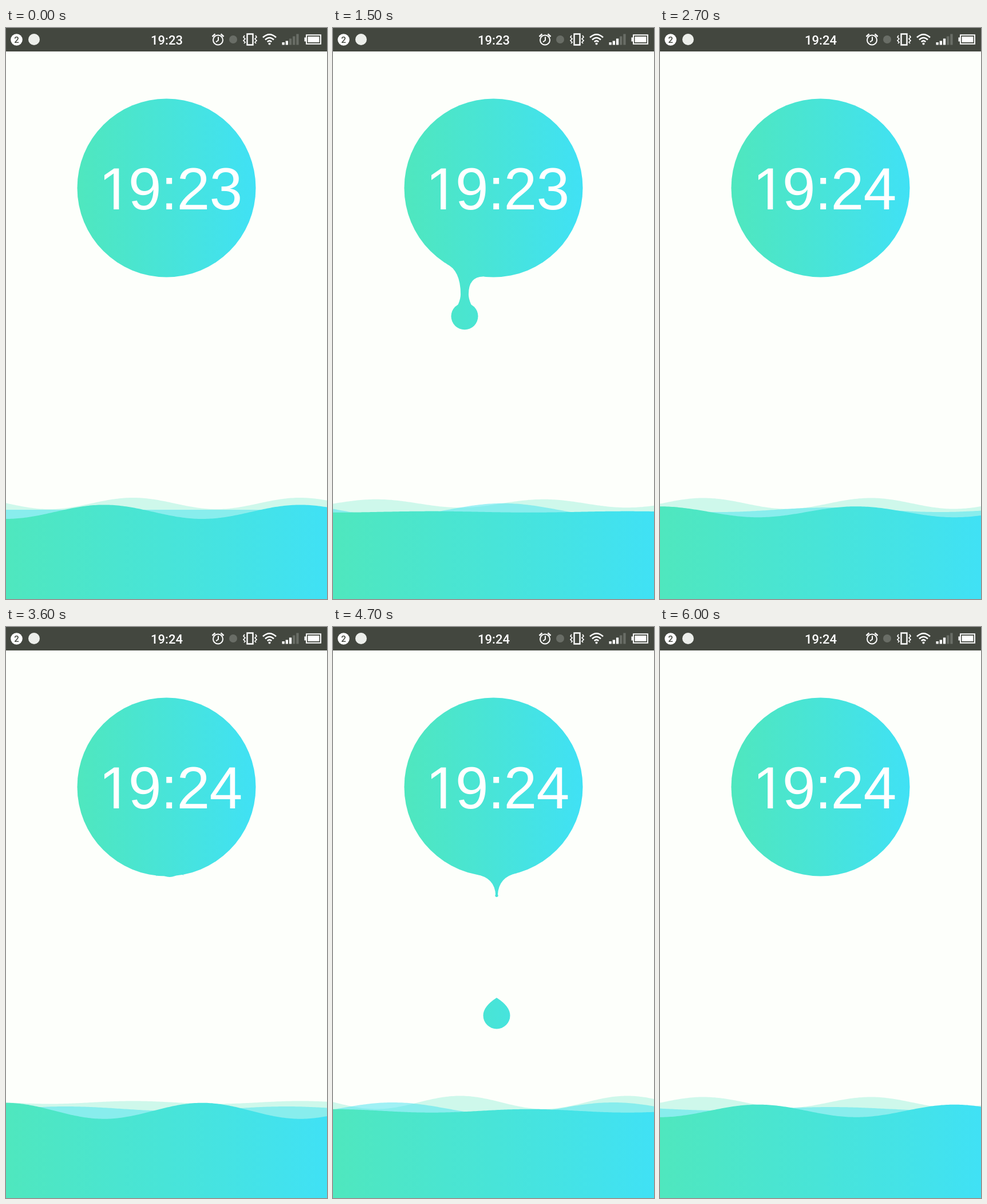
Animation, 561 px wide and 998 px high, one loop 6.1 s. Source, as an HTML page with a canvas:

```html
<!DOCTYPE html>
<html lang="en">
<head>
<meta charset="utf-8">
<title>Water clock</title>
<style>
  html, body { margin: 0; width: 100%; height: 100%; overflow: hidden; background: #fdfffb; }
  canvas { display: block; }
</style>
</head>
<body>
<canvas id="stage" width="561" height="998"></canvas>
<script>
const W = 561, H = 998, LOOP = 6100, STEP = 100;
const CX = 280.5, CY = 279.5, R = 156, BALL = 23.5;
const BAR = '#43473f', DIM = '#696d66';
const c = document.getElementById('stage').getContext('2d');

function gradient(x0, x1) {
  const g = c.createLinearGradient(x0, 0, x1, 0);
  g.addColorStop(0, '#4fe7be');
  g.addColorStop(0.5, '#48e4d8');
  g.addColorStop(1, '#40e1f5');
  return g;
}
const clockFill = gradient(CX - R, CX + R);

// Standing waves: [time, height] keys, joined by straight segments
const waves = [
  { level: 831, length: 292, crest: 222, fill: 'rgba(78,230,192,.27)',
    keys: [[0, 10], [900, 1.5], [2000, -14.5], [2100, -14.5], [2700, -9.5], [3600, 2.5], [4450, 13], [4700, 11.5], [6000, -9.5], [6100, -11]] },
  { level: 842, length: 385, crest: 297, fill: 'rgba(68,228,240,.5)',
    keys: [[0, 0], [900, 7.5], [1700, 12.5], [2100, 10], [2700, 4], [3600, -4], [4500, -12], [4700, -11], [6000, 3], [6100, 4]] },
  { level: 845.7, length: 343, crest: 171.5, fill: gradient(0, W),
    keys: [[0, 12.3], [900, 6.5], [2100, -4.3], [2700, -9.5], [3400, -14.5], [3600, -14], [4700, -3], [6000, 11], [6100, 12.3]] }
];

function valueAt(keys, t) {
  const i = keys.findIndex(k => k[0] > t);
  const [t0, v0] = keys[i - 1], [t1, v1] = keys[i];
  return v0 + (v1 - v0) * (t - t0) / (t1 - t0);
}

function drawWave({ level, length, crest, fill, keys }, t) {
  const height = valueAt(keys, t);
  c.beginPath();
  c.moveTo(0, H);
  for (let x = 0; x <= W; x += 3)
    c.lineTo(x, level - height * Math.cos(2 * Math.PI * (x - crest) / length));
  c.lineTo(W, H);
  c.fillStyle = fill;
  c.fill();
}

function disc(x, y, r, fill) {
  c.fillStyle = fill;
  c.beginPath();
  c.arc(x, y, r, 0, 2 * Math.PI);
  c.fill();
}

const rim = x => CY + Math.sqrt(R * R - (x - CX) ** 2);

// Height of the bend where the rim turns into the hanging water
const bend = (x, side) => (rim(x) + rim(side)) / 2 + 4;

function drawDrip(x, s) {
  if (s < -0.24 || s > 2) return;
  const y = 410 + 70 * s + 144 * s * s, snap = 0.72;
  c.fillStyle = clockFill;
  if (s < snap) {
    disc(x, y, BALL, clockFill);
    if (y > 412) drawNeck(x, y);
    return;
  }
  const tip = y - 31 - Math.max(0, 1.1 - s) * 35;
  c.beginPath();
  c.moveTo(x, tip);
  c.quadraticCurveTo(x + BALL, y - 16, x + BALL, y);
  c.arc(x, y, BALL, 0, Math.PI);
  c.quadraticCurveTo(x - BALL, y - 16, x, tip);
  c.fill();
  const len = 60 - 130 * (s - snap) ** 2;
  if (len > 0) drawStub(x, len);
}

function drawNeck(x, y) {
  const p = Math.min(1, (y - 412) / 120);
  const waist = 2 + 21 * (1 - p), base = 24 + 11 * p, mid = (rim(x) + y) / 2;
  const left = x - base, right = x + base;
  c.beginPath();
  c.moveTo(left, rim(left));
  c.quadraticCurveTo(x - waist, bend(x, left), x - waist, mid);
  c.quadraticCurveTo(x - waist, y - BALL, x - BALL, y);
  c.lineTo(x + BALL, y);
  c.quadraticCurveTo(x + waist, y - BALL, x + waist, mid);
  c.quadraticCurveTo(x + waist, bend(x, right), right, rim(right));
  c.fill();
}

function drawStub(x, len) {
  const base = Math.min(36, len), end = rim(x) + len;
  const left = x - base, right = x + base;
  c.beginPath();
  c.moveTo(left, rim(left));
  c.quadraticCurveTo(x - 3, bend(x, left), x - 1.8, end - 3);
  c.lineTo(x + 1.8, end - 3);
  c.quadraticCurveTo(x + 3, bend(x, right), right, rim(right));
  c.fill();
  disc(x, end - 2.6, 2.6, clockFill);
}

function drawTime(time) {
  const size = 104, left = 157, base = 317, one = left + 5;
  c.font = size + 'px "Liberation Sans", Arial, sans-serif';
  c.letterSpacing = '-1px';
  c.textAlign = 'left';
  c.fillStyle = '#fff';
  c.fillText(time.slice(1), left + c.measureText('1').width, base);
  // The leading 1 is shown without its foot serif
  c.save();
  c.beginPath();
  c.rect(one, base - size, 60, size * 0.923);
  c.rect(one + size * 0.2515, base - 10, size * 0.0884, 12);
  c.clip();
  c.fillText(time[0], one, base);
  c.restore();
  c.letterSpacing = '0px';
}

function line(d, width, color = '#fff') {
  c.strokeStyle = color;
  c.lineWidth = width;
  c.stroke(new Path2D(d));
}

function drawStatus(time, signal) {
  c.fillStyle = BAR;
  c.fillRect(0, 0, W, 41);
  disc(18.5, 20.5, 10.3, '#fff');
  disc(49, 20, 10, '#eceeea');
  c.textAlign = 'center';
  c.fillStyle = BAR;
  c.font = '500 15px Roboto, sans-serif';
  c.fillText('2', 18.5, 26);
  c.fillStyle = '#fff';
  c.font = '500 22px Roboto, sans-serif';
  c.fillText(time, 281, 28.5);

  // Alarm
  line('M379 21a8.5 8.5 0 1 1-17 0a8.5 8.5 0 1 1 17 0M371 15.5v6l-4 3', 2);
  line('M360.5 15l5-4.5M375.5 10.5l5 4.5', 2.4);
  disc(397, 20, 7, DIM);

  // Vibrate
  line('M421.5 10.5h10v19h-10z', 2.4);
  line('M417 13l-2 3 3 3-3 3 3 3-2 2M436 13l2 3-3 3 3 3-3 3 2 2', 1.7);

  // Wireless
  line('M449 16.5q11.5-10.5 23 0M453 20.5q7.5-7 15 0M456.8 24.2q3.7-3.6 7.4 0', 2.6);
  disc(460.5, 27.5, 2, '#fff');

  for (let i = 0; i < 5; i++) {
    const h = [4.5, 7, 11, 15, 19][i];
    c.fillStyle = i < signal ? '#fff' : DIM;
    c.fillRect(482.5 + i * 6.2, 29.5 - h, 4.3, h);
  }

  // Battery
  line('M525 12.3h25v15.4h-25z', 2);
  c.fillStyle = '#fff';
  c.fillRect(527.5, 15, 20, 10);
  c.fillRect(521.5, 16.5, 3, 7);
}

function draw() {
  const t = Math.floor(performance.now() % LOOP / STEP) * STEP;
  const time = t < 2400 ? '19:23' : '19:24';
  c.fillStyle = '#fdfffb';
  c.fillRect(0, 0, W, H);
  drawDrip(230, (t - 900) / 1000);
  drawDrip(286, (t - 3555) / 1000);
  disc(CX, CY, R, clockFill);
  drawTime(time);
  for (const wave of waves) drawWave(wave, t);
  drawStatus(time, t < 500 ? 2 : 3);
  requestAnimationFrame(draw);
}
draw();
</script>
</body>
</html>
```
